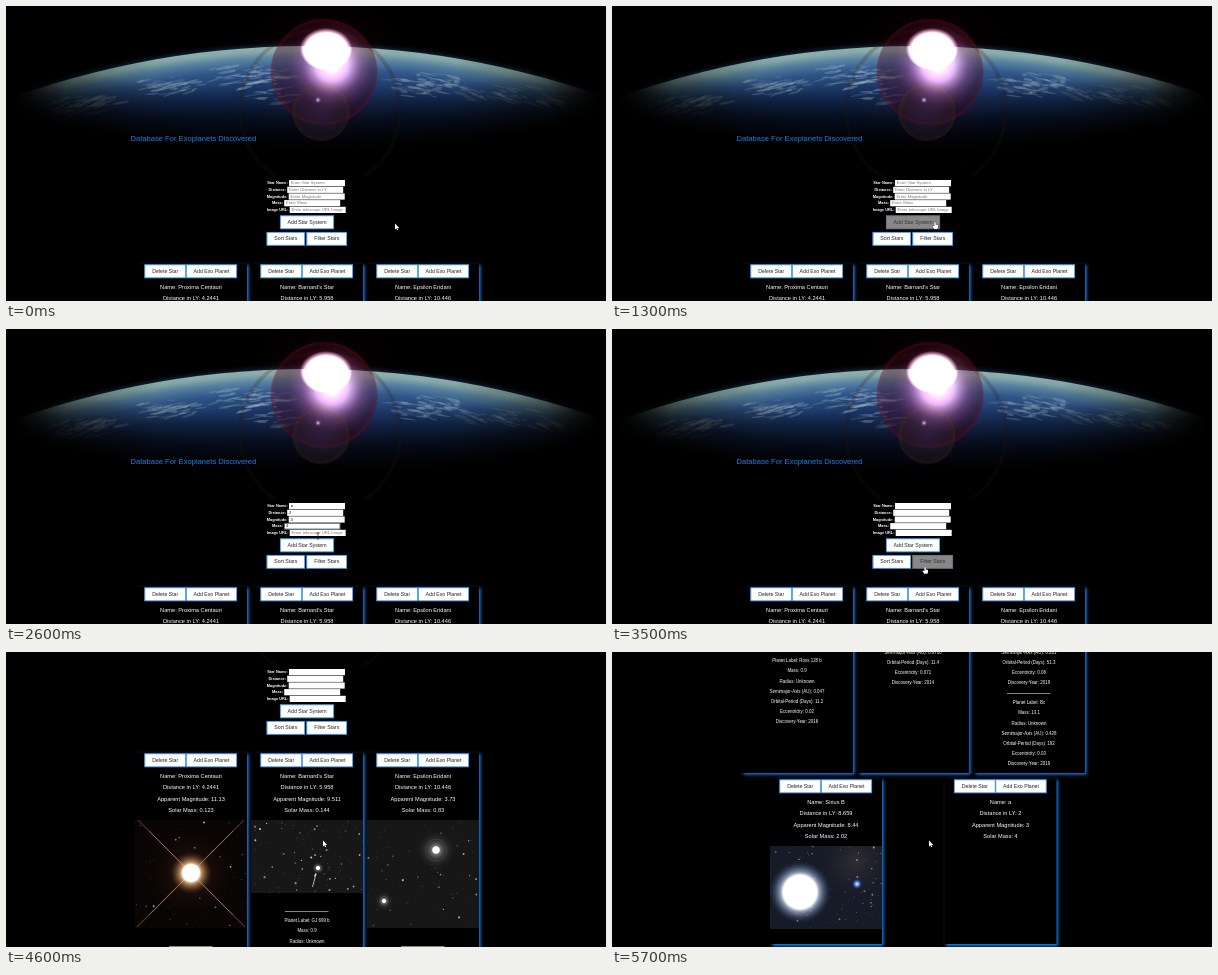
Write an HTML page with a canvas that moves like this. It is 600x295 px and loops after 5.8 s.

```html
<!DOCTYPE html>
<html lang="en">
<head>
<meta charset="utf-8">
<title>Exoplanet database</title>
<style>
html, body { margin: 0; width: 600px; height: 295px; overflow: hidden; background: #000; }
canvas { display: block; }
</style>
</head>
<body>
<canvas id="stage" width="600" height="295"></canvas>
<script>
const LOOP = 5800, STEP = 100;
const FONT = '"Liberation Sans", Arial, sans-serif';
const BLUE = '#1e80e4';
const ctx = document.getElementById('stage').getContext('2d');

function seeded(seed) {
  return () => (seed = (seed * 16807) % 2147483647) / 2147483647;
}

function layer(w, h, paint) {
  const c = document.createElement('canvas');
  c.width = w;
  c.height = h;
  paint(c.getContext('2d'), w, h);
  return c;
}

// stops: alternating offset and colour
function glow(g, x, y, r, ...stops) {
  const grad = g.createRadialGradient(x, y, 0, x, y, r);
  for (let i = 0; i < stops.length; i += 2) grad.addColorStop(stops[i], stops[i + 1]);
  g.fillStyle = grad;
  g.fillRect(x - r, y - r, 2 * r, 2 * r);
}

function ring(g, x, y, r, width, colour) {
  g.beginPath();
  g.arc(x, y, r, 0, 7);
  g.lineWidth = width;
  g.strokeStyle = colour;
  g.stroke();
}

function line(g, x1, y1, x2, y2, width, colour) {
  g.beginPath();
  g.moveTo(x1, y1);
  g.lineTo(x2, y2);
  g.lineWidth = width;
  g.strokeStyle = colour;
  g.stroke();
}

function text(str, x, y, size, colour, align = 'center', weight = '') {
  ctx.font = `${weight} ${size}px ${FONT}`;
  ctx.textAlign = align;
  ctx.textBaseline = 'middle';
  ctx.fillStyle = colour;
  ctx.fillText(str, x, y);
}

// ---- header picture ----
const header = layer(600, 170, g => {
  const cx = 303, cy = 923, R = 883, rnd = seeded(77);
  const cover = (grad, stops) => {
    stops.forEach(([o, c]) => grad.addColorStop(o, c));
    g.fillStyle = grad;
    g.fillRect(0, 0, 600, 170);
  };
  cover(g.createRadialGradient(cx, cy, R - 1, cx, cy, R + 6),
    [[0, 'rgba(50,90,130,.45)'], [1, 'rgba(10,20,50,0)']]);

  g.save();
  g.beginPath();
  g.arc(cx, cy, R, 0, 7);
  g.clip();
  cover(g.createRadialGradient(cx, cy, R - 110, cx, cy, R),
    [[0, '#050d20'], [.35, '#0d1f45'], [.62, '#1b396c'], [.8, '#325c92'], [.9, '#5a85a4'], [.96, '#86a9a8'], [1, '#8cb0b4']]);

  // cloud banks: x, y, half width, half height, streaks
  g.filter = 'blur(.6px)';
  [[60, 101, 42, 10, 55], [95, 95, 30, 8, 30], [165, 81, 32, 10, 50], [245, 70, 45, 14, 65],
   [270, 90, 30, 9, 16], [425, 79, 45, 13, 65], [490, 88, 40, 9, 35], [550, 96, 32, 7, 30]]
    .forEach(([x, y, w, h, n]) => {
      while (n--) {
        const px = x + (rnd() + rnd() - 1) * w, py = y + (rnd() + rnd() - 1) * h;
        g.beginPath();
        g.ellipse(px, py, 2 + rnd() * 8, .5 + rnd(), (px - cx) / 700 + (rnd() - .5) * .3, 0, 7);
        g.fillStyle = `rgba(180,200,212,${.1 + rnd() * .3})`;
        g.fill();
      }
    });
  g.restore();

  // night side, curving down towards the middle, and dark left and right ends
  cover(g.createRadialGradient(cx, -949, 1005, cx, -949, 1096),
    [[0, 'rgba(0,0,0,0)'], [.35, 'rgba(0,0,0,.12)'], [.75, 'rgba(0,0,0,.72)'], [1, '#000']]);
  cover(g.createLinearGradient(0, 0, 600, 0),
    [[0, 1], [.012, 1], [.1, .3], [.25, 0], [.75, 0], [.9, .3], [.988, 1], [1, 1]]
      .map(([o, a]) => [o, `rgba(0,0,0,${a})`]));

  // lens flare discs, then the sun
  glow(g, 318, 66, 54, 0, 'rgba(70,12,36,.5)', .9, 'rgba(52,5,20,.4)', .97, 'rgba(100,8,26,.45)', 1, 'rgba(40,0,10,0)');
  glow(g, 315, 106, 30, 0, 'rgba(46,42,78,.5)', .8, 'rgba(40,30,40,.4)', .94, 'rgba(62,42,24,.4)', 1, 'rgba(0,0,0,0)');
  ring(g, 314, 104, 80, 4, 'rgba(40,22,14,.2)');
  g.globalCompositeOperation = 'lighter';
  glow(g, 320, 60, 90, 0, 'rgba(60,8,24,.4)', 1, 'rgba(12,0,4,0)');
  glow(g, 326, 60, 46, 0, 'rgba(255,238,250,1)', .35, 'rgba(235,195,235,.7)', .65, 'rgba(140,90,140,.3)', 1, 'rgba(40,10,40,0)');
  glow(g, 312, 94, 4, 0, 'rgba(240,225,240,.8)', .35, 'rgba(170,150,190,.4)', 1, 'rgba(0,0,0,0)');
  g.translate(320, 43);
  g.scale(1.25, 1);
  glow(g, 0, 0, 21, 0, '#fff', .75, '#fff', 1, 'rgba(255,225,245,0)');
});

// ---- star photographs ----
function sky(h, base, n, seed, paint) {
  return layer(112, h, g => {
    const rnd = seeded(seed);
    g.fillStyle = base;
    g.fillRect(0, 0, 112, h);
    while (n--) {
      g.beginPath();
      g.arc(rnd() * 112, rnd() * h, .25 + rnd() ** 4 * .9, 0, 7);
      g.fillStyle = `rgba(235,235,235,${.25 + rnd() * .6})`;
      g.fill();
    }
    paint(g, h);
  });
}

const whiteStar = (g, x, y, r) =>
  glow(g, x, y, r, 0, '#fff', .3, '#fff', .4, 'rgba(160,160,160,.5)', 1, 'rgba(60,60,60,0)');

const pics = {
  cross: sky(108, '#080504', 55, 11, g => {
    glow(g, 56, 53, 50, 0, 'rgba(110,55,28,.55)', .4, 'rgba(45,20,12,.45)', 1, 'rgba(15,6,4,0)');
    for (const s of [-1, 1]) {
      line(g, 56 - 54, 53 - 54 * s, 56 + 54, 53 + 54 * s, 1.2, 'rgba(150,95,75,.45)');
      line(g, 56 - 42, 53 - 42 * s, 56 + 42, 53 + 42 * s, .6, 'rgba(225,195,175,.6)');
    }
    glow(g, 56, 53, 21, 0, '#fff', .4, '#fff', .52, 'rgba(240,190,130,.7)', 1, 'rgba(100,50,20,0)');
  }),
  arrow: sky(73, '#171717', 120, 23, g => {
    whiteStar(g, 67, 48, 6);
    line(g, 61.5, 67, 65, 54, .8, '#ddd');
    line(g, 63.6, 56.5, 65, 53.5, 1.4, '#ddd');
  }),
  halo: sky(108, '#171717', 75, 31, g => {
    glow(g, 69, 30, 19, 0, '#555', .6, 'rgba(60,60,60,.5)', 1, 'rgba(40,40,40,0)');
    ring(g, 69, 30, 11, .5, 'rgba(150,150,150,.35)');
    whiteStar(g, 69, 30, 11);
    glow(g, 17, 81, 10, 0, '#555', 1, 'rgba(40,40,40,0)');
    whiteStar(g, 17, 81, 6);
  }),
  red: sky(112, '#0a0606', 50, 47, g =>
    glow(g, 56, 56, 40, 0, '#fff', .25, '#ffc890', .4, 'rgba(190,70,30,.6)', 1, 'rgba(40,8,4,0)')),
  field: sky(73, '#141416', 90, 59, g => whiteStar(g, 55, 36, 8)),
  dim: sky(73, '#100c0c', 70, 61, g =>
    glow(g, 56, 36, 26, 0, '#fff', .3, '#f4a070', 1, 'rgba(60,20,10,0)')),
  pair: sky(83, '#161b28', 130, 71, g => {
    glow(g, 85, 16, 42, 0, 'rgba(90,70,66,.4)', 1, 'rgba(30,30,40,0)');
    glow(g, 30, 46, 31, 0, '#fff', .54, '#fff', .64, 'rgba(200,215,245,.65)', 1, 'rgba(40,60,110,0)');
    glow(g, 87, 38, 5, 0, '#fff', .3, '#7fb0ff', 1, 'rgba(30,80,220,0)');
  })
};

// ---- page data ----
const PLANET = ['Planet Label', 'Mass', 'Radius', 'Semimajor-Axis (AU)', 'Orbital-Period (Days)', 'Eccentricity', 'Discovery-Year'];
const STAR = ['Name', 'Distance in LY', 'Apparent Magnitude', 'Solar Mass'];
const star = (info, pic, ...planets) => ({ info, pic, planets });

const rows = [
  { top: 257.5, bottom: 531, centres: [185, 301, 417], stars: [
    star(['Proxima Centauri', '4.2441', '11.13', '0.123'], pics.cross,
      ['Proxima b', '1.27', 'Unknown', '0.0485', '11.2', '0.11', '2016']),
    star(["Barnard's Star", '5.958', '9.511', '0.144'], pics.arrow,
      ['GJ 699 b', '0.9', 'Unknown', '0.404', '232.8', '0.32', '2018']),
    star(['Epsilon Eridani', '10.446', '3.73', '0.83'], pics.halo,
      ['b', '0.78', 'Unknown', '3.48', '2502', '0.07', '2000'])] },
  { top: 536, bottom: 855, centres: [185, 301, 417], stars: [
    star(['Ross 128', '11.007', '11.13', '0.168'], pics.red,
      ['Ross 128 b', '0.9', 'Unknown', '0.047', '11.2', '0.02', '2016']),
    star(['Groombridge 34', '11.62', '8.1', '0.38'], pics.field,
      ['GJ 15 A b', '5.3', 'Unknown', '0.0710', '11.4', '0.071', '2014']),
    star(['Gliese 229', '18.8', '8.14', '0.58'], pics.dim,
      ['Bb', '4.2', 'Unknown', '0.261', '51.3', '0.06', '2019'],
      ['Bc', '13.1', 'Unknown', '0.428', '192', '0.03', '2019'])] },
  { top: 860.5, bottom: 1026, centres: [214, 388.5], stars: [
    star(['Sirius B', '8.659', '8.44', '2.02'], pics.pair),
    star(['a', '2', '3', '4'], null)] }
];
const filtered = [{ top: 257.5, bottom: 496, centres: [301], stars: [rows[0].stars[1]] }];

// label, placeholder, field x, typed value, time typed
const fields = [
  ['Star Name:', 'Enter Star System', 283, 'a', 1700],
  ['Distance:', 'Enter Distance in LY', 281.2, '2', 1900],
  ['Magnitude:', 'Enter Magnitude', 282.7, '3', 2200],
  ['Mass:', 'Enter Mass', 278.2, '4', 2500],
  ['Image URL:', 'Enter telescope URL Image', 283.7, '', 0]
];
const formButtons = [
  ['Add Star System', 274, 209.5, 54],
  ['Sort Stars', 260.7, 226, 38.3],
  ['Filter Stars', 300.5, 226, 40.5]
];
const BUTTON_H = 13.6, SUBMIT = 2900, FILTER_ON = 3600, FILTER_OFF = 4300;

// ---- motion: time followed by values ----
const scrollPath = [[0, 0], [3500, 0], [3800, 23], [4100, 46], [4400, 46], [4600, 157], [5400, 734]];
const cursorPath = [[0, 389, 217.5], [600, 389, 217.5], [1100, 323, 216], [1400, 323, 216], [1600, 312, 177],
  [1800, 312, 177], [2400, 312, 197], [2600, 312, 207], [2700, 312, 216], [3000, 312, 216], [3300, 313, 237.5],
  [4000, 313, 238.5], [4200, 317, 188.5]];

function along(path, t) {
  let i = 0;
  while (i < path.length - 1 && path[i + 1][0] <= t) i++;
  const a = path[i], b = path[i + 1] || a;
  const k = b === a ? 0 : (t - a[0]) / (b[0] - a[0]);
  return a.slice(1).map((v, j) => v + (b[j + 1] - v) * k);
}

const inside = (p, x, y, w, h) => p.x >= x && p.x <= x + w && p.y >= y && p.y <= y + h;

// ---- drawing ----
function button(label, x, y, w, hover) {
  ctx.fillStyle = hover ? '#888' : '#fff';
  ctx.fillRect(x, y, w, BUTTON_H);
  ctx.lineWidth = .8;
  ctx.strokeStyle = hover ? '#666c74' : BLUE;
  ctx.strokeRect(x + .3, y + .3, w - .6, BUTTON_H - .6);
  text(label, x + w / 2, y + BUTTON_H / 2, 5.2, hover ? '#333' : '#222');
}

function form(t, p) {
  fields.forEach(([label, hint, x, value, at], i) => {
    const y = 177.2 + i * 6.7, sent = t >= SUBMIT, typed = value && t >= at;
    text(label, x - 1.2, y, 3.9, '#fff', 'right', 'bold');
    ctx.fillStyle = '#fff';
    ctx.fillRect(x, y - 3.2, 56, 6.2);
    const next = fields[i + 1];
    if (typed && !sent && t < (next[4] || SUBMIT)) {
      ctx.lineWidth = .7;
      ctx.strokeStyle = '#555';
      ctx.strokeRect(x + .3, y - 2.9, 55.4, 5.6);
    }
    if (!sent) text(typed ? value : hint, x + 1.8, y, 4.2, typed ? '#111' : '#777', 'left');
  });
  formButtons.forEach(([label, x, y, w]) => button(label, x, y, w, inside(p, x, y, w, BUTTON_H)));
}

function card({ info, pic, planets }, cx, top, bottom) {
  ctx.save();
  ctx.shadowColor = '#1684f5';
  ctx.shadowBlur = 3;
  ctx.shadowOffsetX = ctx.shadowOffsetY = 1.5;
  ctx.fillStyle = '#000';
  ctx.fillRect(cx - 56, top, 112, bottom - top);
  ctx.restore();

  button('Delete Star', cx - 46.5, top + 1, 41.5);
  button('Add Exo Planet', cx - 5, top + 1, 51);
  info.forEach((v, i) => text(`${STAR[i]}: ${v}`, cx, top + 23.7 + i * 11.4, 5.65, '#fff'));
  if (!pic) return;
  const imageTop = Math.round(top + 67);
  ctx.drawImage(pic, Math.round(cx - 56), imageTop);
  planets.forEach((planet, n) => {
    const y = imageTop + pic.height + 18 + n * 81;
    line(ctx, cx - 22, y + .5, cx + 21.5, y + .5, .8, '#aaa');
    planet.forEach((v, i) => text(`${PLANET[i]}: ${v}`, cx, y + 10 + i * 10.15, 4.45, '#fff'));
  });
}

const ARROW = new Path2D('M0 0V6L1.4 4.8L2.3 6.7L3.2 6.3L2.4 4.5H4.2Z');
const HAND = new Path2D('M-.6 .5Q0 -.5 .7 .5V2.6L3 3.2V5.5L2.2 7H-.8L-2.6 4.2L-1.8 3.6L-.6 4.4Z');
const BEAM = new Path2D('M-1.2 -3H1.2M0 -3V3M-1.2 3H1.2');

function cursor(x, y, page, t) {
  const hand = formButtons.some(([, bx, by, w]) => inside(page, bx, by, w, BUTTON_H));
  const beam = fields.some((f, i) => inside(page, f[2], 174 + i * 6.7, 56, 6.7)) || (t > FILTER_ON && t <= 4000);
  ctx.save();
  ctx.translate(x, y);
  ctx.lineWidth = .7;
  if (beam && !hand) {
    ctx.strokeStyle = '#333';
    ctx.stroke(BEAM);
  } else {
    const shape = hand ? HAND : ARROW;
    ctx.fillStyle = '#fff';
    ctx.strokeStyle = '#222';
    ctx.stroke(shape);
    ctx.fill(shape);
  }
  ctx.restore();
}

function draw(t) {
  const scroll = Math.round(along(scrollPath, t)[0]);
  const [x, y] = along(cursorPath, t);
  const page = { x, y: y + scroll };
  ctx.fillStyle = '#000';
  ctx.fillRect(0, 0, 600, 295);
  ctx.save();
  ctx.translate(0, -scroll);
  ctx.drawImage(header, 0, 0);
  text('Database For Exoplanets Discovered', 124.5, 133, 7.6, BLUE, 'left');
  form(t, page);
  for (const row of t >= FILTER_ON && t < FILTER_OFF ? filtered : rows)
    row.stars.forEach((s, i) => card(s, row.centres[i], row.top, row.bottom));
  ctx.restore();
  cursor(x, y, page, t);
}

const start = performance.now();
function tick() {
  const t = (performance.now() - start) % LOOP;
  draw(Math.floor(t / STEP) * STEP);
  requestAnimationFrame(tick);
}
tick();
</script>
</body>
</html>
```
